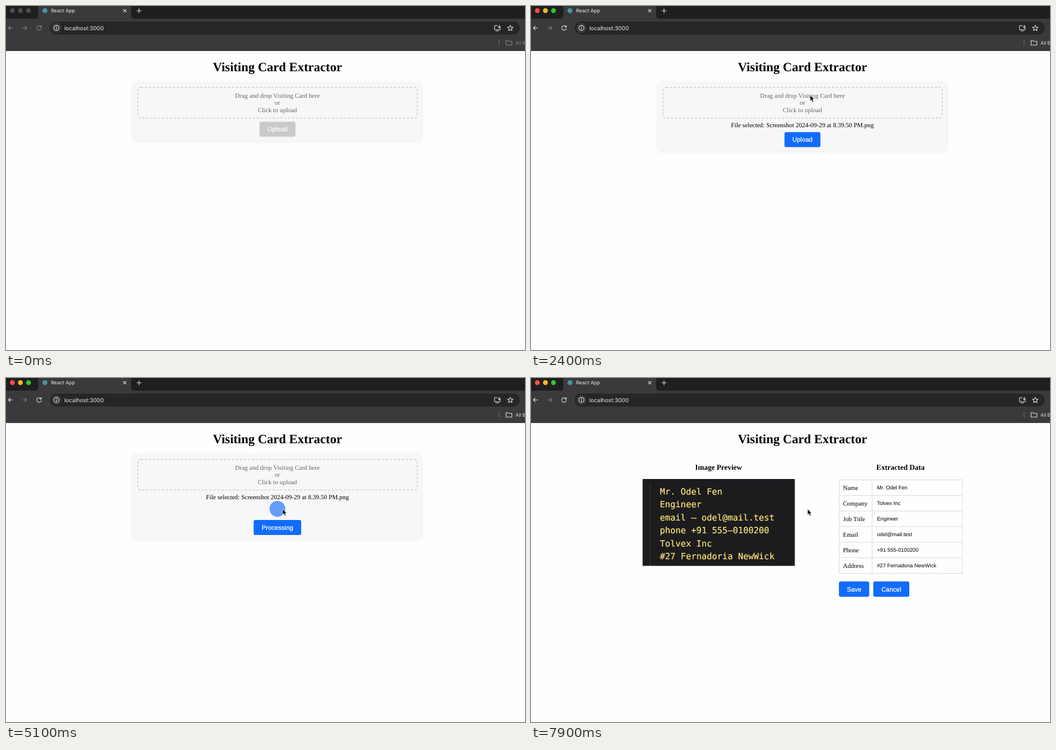
Recreate the animation shown at these times as an HTML page. Size 900 px wide and 596 px high, loop 8000 ms.

```html
<!DOCTYPE html>
<html lang="en">
<head>
<meta charset="utf-8">
<title>Visiting Card Extractor</title>
<style>
  html, body { margin: 0; width: 100%; height: 100%; overflow: hidden; background: #fefefe; }
  svg { display: block; width: 900px; height: 596px; text-rendering: geometricPrecision; }
  .serif { font: 11px "Liberation Serif", serif; }
  .sans { font: 11px "Liberation Sans", sans-serif; }
  .cell { font-size: 9.17px; }
  .ui { font-family: Inter, sans-serif; fill: #ececee; }
  .mono { font: 15px "DejaVu Sans Mono", monospace; fill: #ffe873; stroke: #ffe873; stroke-width: .2; }
  .label { fill: #fff; stroke: #fff; stroke-width: .25; }
  .mid { text-anchor: middle; }
  .h1 { font: bold 22px "Liberation Serif", serif; }
  .h3 { font: bold 12.87px "Liberation Serif", serif; }
  .line { fill: none; stroke: #dfdfe2; stroke-width: 1.1; stroke-linecap: round; stroke-linejoin: round; }
  .focus { --fg: #dfdfe2; --red: #ff4f44; --amber: #fdb924; --green: #34c52c; }
  .blur { --fg: #87878a; --red: #4c4c4f; --amber: #4c4c4f; --green: #4c4c4f; }
  .tint { stroke: var(--fg); }
  .btn { fill: #126cf8; }
  .off { fill: #c9c9cc; }
  .grid { stroke: #dcdce0; fill: none; }
  #panel { fill: #f7f7f9; filter: drop-shadow(0 0 3.4px rgba(0, 0, 0, .1)); }
</style>
</head>
<body>
<svg viewBox="0 0 900 596">
  <rect width="900" height="596" fill="#fefefe"/>

  <g id="chrome" class="blur">
    <rect width="900" height="78" fill="#3a3a3c"/>
    <path d="M0 0H56V16Q56 22 50 22H0Z M217 0H900V22H223Q217 22 217 16Z" fill="#1f1f21"/>
    <circle cx="11" cy="8" r="4.2" fill="var(--red)"/>
    <circle cx="25" cy="8" r="4.2" fill="var(--amber)"/>
    <circle cx="39" cy="8" r="4.2" fill="var(--green)"/>
    <circle cx="67.5" cy="8" r="4.3" fill="#4795a8"/>
    <text class="ui" x="78" y="11.2" font-size="8.5">React App</text>
    <path class="line" d="M203.7 5.8l4.6 4.6m0-4.6l-4.6 4.6M227 8.2h7.4M230.7 4.5v7.4"/>
    <path class="line tint" d="M11.6 38H4.4m3-3.2L4.2 38l3.2 3.2M60.4 35.4a4 4 0 1 0 .9 3.4M61.2 33.8v2.6h-2.6"/>
    <path class="line" style="stroke:#808083" d="M28.6 38h7.2m-3-3.2L36 38l-3.2 3.2"/>
    <rect x="76" y="27" width="815" height="22.5" rx="11.2" fill="#262628"/>
    <circle cx="87.5" cy="38" r="8.5" fill="#3a3a3c"/>
    <circle class="line" cx="87.5" cy="38" r="4.4"/>
    <path class="line" d="M87.5 37.8v2.3M87.5 35.8v.1"/>
    <text class="ui" x="101" y="41.5" font-size="9.7">localhost:3000</text>
    <path class="line" d="M852.5 34h-5.3v7h9.8v-2.2M849.5 43h5M855.6 33.2v4.6m-1.9-1.8l1.9 1.9 1.9-1.9"/>
    <path class="line" d="M874.5 33.4l1.4 3.2 3.4.3-2.6 2.3.8 3.4-3-1.8-3 1.8.8-3.4-2.6-2.3 3.4-.3Z"/>
    <path d="M855 58.5v10" stroke="#707073"/>
    <path class="line tint" d="M867.2 60h3.6l1.2 1.3h5.2v6.4h-10Z"/>
    <text class="ui" x="883.5" y="66.6" font-size="8.3" style="fill:var(--fg)">All Bookmarks</text>
  </g>

  <text class="h1 mid" x="470.7" y="113">Visiting Card Extractor</text>

  <g id="form">
    <rect id="panel" x="220.5" y="133.5" width="499.5" rx="5.5"/>
    <rect x="228.7" y="141.2" width="484.6" height="53" rx="5.5" fill="none"
      stroke="#c6c6ca" stroke-width="1.3" stroke-dasharray="4.1 2.75"/>
    <g class="serif mid" fill="#666">
      <text x="470.7" y="158.8">Drag and drop Visiting Card here</text>
      <text x="470.7" y="171.3">or</text>
      <text x="470.7" y="183.8">Click to upload</text>
    </g>
    <text id="file" class="serif mid" x="470.7" y="210">File selected: Screenshot 2024-09-29 at 8.39.50 PM.png</text>
    <g id="loader" class="btn" fill-opacity=".64">
      <circle cx="470.7" cy="226.7"/>
      <circle cx="470.7" cy="226.7"/>
    </g>
    <g id="send">
      <rect height="26" rx="3"/>
      <text class="sans label mid" x="470.7" y="16.8"></text>
    </g>
  </g>

  <g id="result">
    <text class="h3 mid" x="325.3" y="158.7">Image Preview</text>
    <text class="h3 mid" x="640.8" y="158.7">Extracted Data</text>
    <rect x="193.5" y="175" width="264" height="150.5" fill="#1c1c1f"/>
    <path d="M206.5 184V325" stroke="#36363a"/>
    <g id="card" class="mono"></g>
    <g id="table"></g>
  </g>

  <g id="item">
    <rect x="446" y="133" width="48" height="32" rx="6" fill="#dcdce0" opacity=".7"/>
    <rect x="450.5" y="137" width="39" height="24" rx="1.5" fill="#fcfcfc"/>
    <rect x="452" y="138.5" width="36" height="21" fill="#252527"/>
    <path d="M456 142.3h12M456 145.2h9M456 148.1h26M456 151h25M456 153.9h12M456 156.8h26"
      stroke="#a3975a" stroke-dasharray="3 1"/>
    <rect x="443" y="176" width="54" height="13" rx="1.5" fill="#1c59c4"/>
    <rect x="428" y="187" width="84" height="11.5" rx="1.5" fill="#1c59c4"/>
    <g class="ui mid" font-size="8.5" font-weight="600">
      <text x="470" y="184.5">Screenshot</text>
      <text x="470" y="195.3">2024-0...39.50 PM</text>
    </g>
    <circle cx="490" cy="170" r="6.5" fill="#2fb52c"/>
    <path d="M486.5 170h7M490 166.5v7" stroke="#fff" stroke-width="1.7"/>
  </g>

  <path id="cursor" d="M0 0V10.2L2.4 8L4.2 12L6 11.2L4.3 7.3H7.4Z" fill="#000" stroke="#fff" stroke-width=".7"/>
</svg>

<script>
const LOOP = 8000, STEP = 100;
const DRAG = 500, DROP = 1700, SUBMIT = 3200, DONE = 7800;
const $ = id => document.getElementById(id);

const person = {
  Name: 'Mr. Odel Fen',
  Company: 'Tolvex Inc',
  'Job Title': 'Engineer',
  Email: 'odel@mail.test',
  Phone: '+91 555-0100200',
  Address: '#27 Fernadoria NewWick'
};

function button(x, w, label) {
  return `<rect class="btn" x="${x}" y="352.5" width="${w}" height="26.5" rx="3"/>
    <text class="sans label mid" x="${x + w / 2}" y="369.5">${label}</text>`;
}

function buildResult() {
  $('card').innerHTML = [
    person.Name, person['Job Title'], 'email – ' + person.Email,
    'phone ' + person.Phone.replace('-', '–'), person.Company, person.Address
  ].map((s, i) => `<text x="223.5" y="${202 + i * 22.4}">${s}</text>`).join('');

  const rows = Object.entries(person).map(([key, value], i) => {
    const y = 176.5 + i * 27;
    return `<path class="grid" d="M534 ${y}H748.5"/>
      <text class="serif" x="541" y="${y + 17.2}">${key}</text>
      <text class="sans cell" x="600" y="${y + 16.8}">${value}</text>`;
  });
  $('table').innerHTML = rows.join('') +
    '<path class="grid" d="M534 338.5H748.5M534.5 176V339M591.5 176V339M748 176V339"/>' +
    button(534, 52.5, 'Save') + button(593.5, 62.5, 'Cancel');
}

// Linear walk through rows of [time, x, y].
function along(path, t) {
  if (t <= path[0][0]) return path[0].slice(1);
  for (let i = 1; i < path.length; i++) {
    const [t0, x0, y0] = path[i - 1], [t1, x1, y1] = path[i];
    if (t < t1) {
      const k = (t - t0) / (t1 - t0);
      return [x0 + (x1 - x0) * k, y0 + (y1 - y0) * k];
    }
  }
  return path[path.length - 1].slice(1);
}

const dragPath = [[500, 250, 251], [900, 70, 131], [1000, 18, 36], [1100, 0, 0]];
const cursorPath = [[2400, 484, 154.5], [2600, 483, 172], [2800, 480, 215], [3000, 479.5, 227]];

// CSS ease-in-out: cubic-bezier(.42, 0, .58, 1), solved by bisection.
function easeInOut(x) {
  let lo = 0, hi = 1;
  for (let i = 0; i < 24; i++) {
    const u = (lo + hi) / 2;
    const bx = 1.26 * u * (1 - u) ** 2 + 1.74 * u * u * (1 - u) + u ** 3;
    if (bx < x) lo = u; else hi = u;
  }
  return lo * lo * (3 - 2 * lo);
}

function bounce(ms) {
  const p = (ms % 2000) / 1000;
  return 14 * easeInOut(p < 1 ? p : 2 - p);
}

function show(id, on) {
  $(id).style.display = on ? '' : 'none';
}

function move(id, [x, y]) {
  $(id).setAttribute('transform', `translate(${x} ${y})`);
}

function setButton(label, width, y, enabled) {
  const [box, text] = $('send').children;
  box.setAttribute('x', 470.7 - width / 2);
  box.setAttribute('width', width);
  box.setAttribute('class', enabled ? 'btn' : 'off');
  text.textContent = label;
  move('send', [0, y]);
  $('panel').setAttribute('height', y - 100.5);
}

function draw(t) {
  const dropped = t >= DROP, busy = t >= SUBMIT, done = t >= DONE;
  const dragging = t >= DRAG && !dropped;

  $('chrome').setAttribute('class', dropped ? 'focus' : 'blur');
  show('form', !done);
  show('result', done);
  show('file', dropped);
  show('loader', busy);
  show('item', dragging);
  show('cursor', t >= DRAG);

  if (busy) setButton('Processing', 82.5, 246, true);
  else setButton('Upload', 62.3, dropped ? 218.5 : 200.5, dropped);

  const [a, b] = $('loader').children, spin = Math.max(0, t - SUBMIT);
  a.setAttribute('r', bounce(spin));
  b.setAttribute('r', bounce(spin + 1000));

  const [dx, dy] = along(dragPath, t);
  move('item', [dx, dy]);
  move('cursor', dragging ? [484 + dx, 154.5 + dy] : along(cursorPath, t));
}

buildResult();
const start = performance.now();
function tick() {
  const t = (performance.now() - start) % LOOP;
  draw(Math.floor(t / STEP) * STEP);
  requestAnimationFrame(tick);
}
tick();
</script>
</body>
</html>
```
